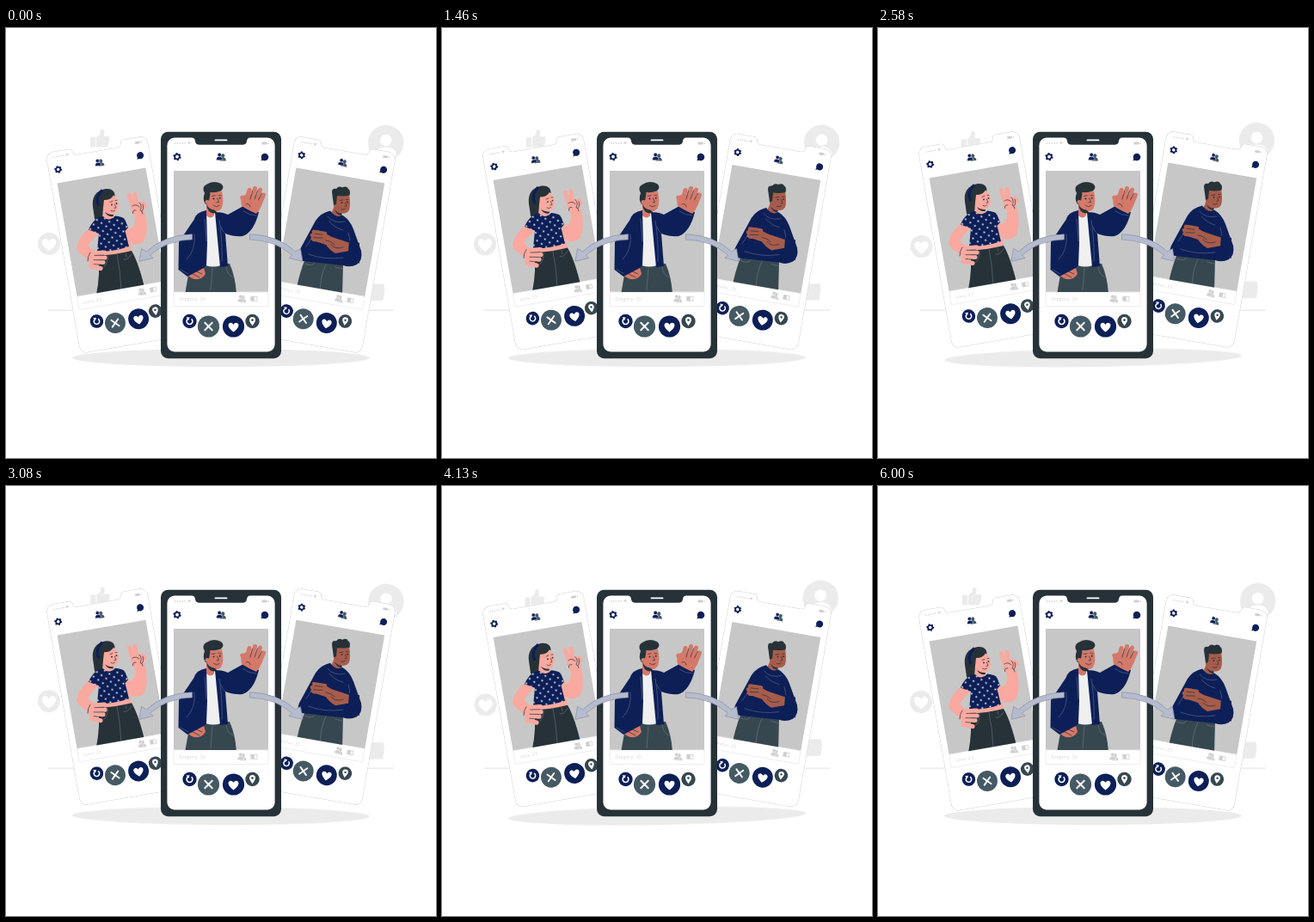
These frames come from a looping animation (500 px wide and 500 px high, 6040 ms). An HTML page without scripts:

```html
<!DOCTYPE html>
<html lang="en">
<head>
<meta charset="utf-8">
<title>Dating cards</title>
<style>
html, body { margin: 0; width: 100%; height: 100%; overflow: hidden; background: #fff; }
svg { display: block; width: 100vw; height: 100vh; }
.navy { fill: #0d1f57; }
.slate { fill: #455a64; }
.dark { fill: #263238; }
.pale { fill: #ebebeb; }
.white { fill: #fff; }
.pink { fill: #f9a99f; }
.tan { fill: #d4796a; }
.brown { fill: #a75c4b; }
.line { fill: none; stroke: #263238; stroke-width: .7; stroke-linecap: round; stroke-linejoin: round; }
.thin { fill: none; stroke: #8b93a6; stroke-width: .4; stroke-linecap: round; }
.limb { fill: none; stroke-linecap: round; stroke-linejoin: round; }
.pinkl { stroke: #f9a99f; }
.tanl { stroke: #d4796a; }
.brownl { stroke: #a75c4b; }
.edge { stroke: #e9e9e9; stroke-width: .8; }
text { font: 5.3px Lato, "Open Sans", sans-serif; letter-spacing: .3px; fill: #d6d6d6; }
.float { animation: float 6.04s linear infinite; }
.wind { transform-box: fill-box; transform-origin: center; animation: wind 6.04s linear infinite; }
@keyframes float {
  0%, 99.34%, 100% { transform: translateY(0); }
  49.67% { transform: translateY(-7px); }
}
@keyframes wind {
  0%, 99.34%, 100% { transform: rotate(0deg); }
  6.21%, 31.04%, 55.88%, 80.71% { transform: rotate(1deg); }
  18.63%, 43.46%, 68.29%, 93.13% { transform: rotate(-1deg); }
}
</style>
</head>
<body>
<svg viewBox="0 0 500 500">
<defs>
  <path id="heart" d="M0 5.6C-3 3.2-6 .6-6-2.2C-6-5.8-1.6-6.4 0-3C1.6-6.4 6-5.8 6-2.2C6 .6 3 3.2 0 5.6Z"/>
  <path id="bust" d="M-3.6 4Q-3.8-.2 0-.2Q3.8-.2 3.6 4ZM0-4.4a2.2 2.2 0 1 1 0 4.4a2.2 2.2 0 1 1 0-4.4Z"/>
  <path id="screen" d="M-54-22.500H-34Q-30.500-22.500-30-18.500Q-29.500-14.200-25-14.200H25Q29.500-14.200 30-18.500Q30.500-22.500 34-22.500H54A8.600 8.600 0 0 1 62.600-13.500V218A8.600 8.600 0 0 1 54 226.500H-54A8.600 8.600 0 0 1-62.600 218V-13.500A8.600 8.600 0 0 1-54-22.500Z"/>
  <rect id="photo" x="-55" y="16" width="110" height="141"/>
  <clipPath id="clipL"><use href="#photo" transform="translate(108.4 156.5) rotate(-9.9) scale(.949)"/></clipPath>
  <clipPath id="clipC"><use href="#photo" transform="translate(250 150)"/></clipPath>
  <clipPath id="clipR"><use href="#photo" transform="translate(391.4 156.5) rotate(9.9) scale(.949)"/></clipPath>
  <pattern id="dots" width="6.600" height="6.600" patternUnits="userSpaceOnUse" patternTransform="rotate(35)">
    <rect width="7" height="7" class="navy"/>
    <circle cx="3.300" cy="3.300" r="1.050" class="white"/>
  </pattern>

  <g id="card">
    <use href="#screen" class="white"/>
    <!-- status bar -->
    <path d="M-54-16H-41" stroke="#d4d4d4" stroke-width="1.400" stroke-dasharray="1.500 1.400"/>
    <path d="M-39-17Q-37-18.500-35-17L-37-14.500Z" fill="#d4d4d4"/>
    <rect x="47.500" y="-17.500" width="6" height="3" rx=".6" fill="#cfcfcf"/>
    <path d="M55.200-17V-15" stroke="#cfcfcf"/>
    <!-- header -->
    <g fill="none" stroke="#0d1f57" transform="translate(-51 -.3)">
      <circle r="2.800" stroke-width="1.900"/>
      <circle r="3.900" stroke-width="1.500" stroke-dasharray="2.040"/>
    </g>
    <use href="#bust" x="2.200" y=".6" class="slate"/>
    <use href="#bust" x="-1.800" y="-.3" class="navy" stroke="#fff" stroke-width=".4"/>
    <path class="navy" d="M51-4.300a4.300 4.300 0 1 1-2.200 8L46.400 4.400L47.300 2.100A4.300 4.300 0 0 1 51-4.300Z"/>
    <!-- photo and caption -->
    <use href="#photo" fill="#c7c7c7"/>
    <rect x="-55" y="157" width="110" height="16.500" class="white edge"/>
    <g fill="#cfcfcf">
      <use href="#bust" x="25.500" y="165.300"/>
      <use href="#bust" x="22.800" y="164.600" stroke="#fff" stroke-width=".4"/>
      <rect x="34.800" y="162.200" width="4" height="5"/>
    </g>
    <rect x="34.800" y="162.200" width="7.200" height="5" fill="none" stroke="#cfcfcf" stroke-width=".8"/>
    <!-- buttons -->
    <circle cx="-36.500" cy="191" r="8.200" class="navy"/>
    <path d="M-38.600 188.400A3.400 3.400 0 1 0-34.400 188.400" fill="none" stroke="#fff" stroke-width="1.600"/>
    <path class="white" d="M-40.300 186.200L-36.200 186.500L-38 190.200Z"/>
    <circle cx="-14.500" cy="197" r="12.600" class="slate"/>
    <path d="M-18.700 192.800l8.400 8.400m0-8.400l-8.400 8.400" stroke="#fff" stroke-width="2" stroke-linecap="round"/>
    <circle cx="14.500" cy="197" r="12.600" class="navy"/>
    <use href="#heart" x="14.500" y="198" class="white"/>
    <circle cx="36.500" cy="191" r="8.200" fill="#37474f"/>
    <path class="white" d="M36.500 196.200Q33 191.500 33 189.500A3.500 3.500 0 0 1 40 189.500Q40 191.500 36.500 196.200Z"/>
    <circle cx="36.500" cy="189.600" r="1.300" fill="#37474f"/>
  </g>

  <path id="arrow" d="M216.500 239.800Q183 241 163.500 260L157.500 256.500L155 271.300L171 267.500L167.500 264Q188 246.500 216.500 246Z" fill="#b6bccd" stroke="#7f88a5" stroke-width=".6" stroke-linejoin="round"/>
</defs>

<path d="M49 328.100H451" stroke="#e0e0e0"/>
<ellipse cx="250" cy="383.500" rx="173" ry="10.500" class="wind pale"/>

<g class="wind pale">
  <path d="M98 127h6v11.500h-6ZM105 127Q110 124.500 110 119Q113.500 116 114.500 120.500Q114.500 123.500 113.500 126H119Q121.500 127 120 129.500Q121 131.500 119.500 133Q120 135 118.500 136Q118.500 138.500 116 138.500H105Z"/>
  <path d="M418 297.500H438Q441 298.500 439.500 301.500Q441.500 304 439.500 306.500Q441 309.500 439 312Q440 317 436 317H418Z"/>
  <circle cx="50" cy="251" r="13"/>
  <use href="#heart" transform="translate(50 252) scale(1.350)" class="white"/>
  <circle cx="441.700" cy="133.500" r="20.700"/>
  <g class="white">
    <circle cx="441.700" cy="130.500" r="6.800"/>
    <path d="M429.700 149Q429.700 138.500 441.700 138.500Q453.700 138.500 453.700 149Z"/>
  </g>
</g>

<g class="float">
  <g transform="translate(108.4 156.5) rotate(-9.9) scale(.949)">
    <use href="#screen" class="edge"/>
    <use href="#card"/>
    <text x="-48" y="167.300">Lena, 23</text>
  </g>
  <!-- woman with raised hand -->
  <g clip-path="url(#clipL)">
    <path class="dark" d="M110 189C119 184.500 127 188 126.500 195L119 212L114 224Q107 227 103 222Q102 214 101 208Q100 200 103 195Q105 191 110 189Z"/>
    <path class="pink" d="M114 200Q122 200 125 194.500Q130 198 131 206Q130.500 215.500 124 217L126 221Q120 227 112 222L113 209Z"/>
    <path class="dark" d="M115 214Q119 217.500 125 217L124.500 219Q118 220 115 214Z"/>
    <path d="M108 207Q103 197 112 188.500" fill="none" stroke="#0d1f57" stroke-width="3.200"/>
    <path class="line" d="M121 202.500l3-1.200M127 200.500l2-.2M126.500 205l1.500 4l-2 .4M122 212.500q2.500 1.500 4.500-.5"/>
    <circle cx="123" cy="205.500" r=".9" class="dark"/>
    <circle cx="128.500" cy="204" r=".9" class="dark"/>
    <path class="limb pinkl" stroke-width="12.500" d="M101 237Q89 248 88.500 256Q94 261 103 268"/>
    <path class="pink" d="M106 258L145 251L146 261L107 267Z"/>
    <path class="pink" d="M138 228L139 247Q151 256 160 248Q167 236 161 213L149 213Q152 224 148 231L144 234Z"/>
    <path class="dark" d="M107 264.500Q126 264 146 259Q155 274 163 310H105Q110 285 107 264.500Z"/>
    <path class="thin" d="M129 263Q133 282 134 304M118 265q1 8-4 13M146 263q-5 8-9 6M139 262l1 4"/>
    <path fill="url(#dots)" d="M105 222Q110 219 113 219Q119 226 127 218.500Q135 219 138 222L142 232L138.500 236L143 254Q126 260 106 260L108 239L96 234.500Q99 227 105 222Z"/>
    <path class="limb pinkl" stroke-width="5.200" d="M101 262L114.500 261M100 267L115 267M99 272L113 272.500M99 277L110 279.500"/>
    <path class="line" d="M103 264.500l11-.4M102 269.700l11 .1M102 274.500l9 1M98 261q-3 4-3 10"/>
    <path class="pink" d="M146 205Q154 199 160 205Q162 214 158 218H149Q143 210 146 205Z"/>
    <path class="limb pinkl" stroke-width="5.200" d="M147.500 207L143.500 195M151.500 206L150 193.500M159 204L161 207"/>
    <path class="line" d="M147 207q4-3 8 1M151 212q-4-1-3.500 3.500M155 203q4 4 1 9q3 1 3 4M159 205q2 5-1 8"/>
  </g>

  <g transform="translate(391.4 156.5) rotate(9.9) scale(.949)">
    <use href="#screen" class="edge"/>
    <use href="#card"/>
    <text x="-48" y="167.300">Rufus, 25</text>
  </g>
  <!-- man with folded arms -->
  <g clip-path="url(#clipR)">
    <path fill="#37474f" d="M348 268L392 274L391 312H336Q340 288 348 268Z"/>
    <path class="thin" d="M372 275Q366 286 365 306M347 274q9 4 12-1M391 280l-8-2"/>
    <path class="brown" d="M382 195L399 193Q401 205 399 212Q395 217 390 215L390 221Q384 226 377 218L381 209Z"/>
    <path class="dark" d="M381 206L379 191Q379 186 384 187Q387 183 391 185.500Q396 183 398 187Q401 189 399.500 194.500Q392 196 385 195L384 205Z"/>
    <path class="dark" d="M382 211Q386 216 391 215.500L390 218Q384 217 382 211Z"/>
    <path class="line" d="M388 200.500l4-.6M395.500 199.500l2.500.2M394.500 203l1.500 4l-2 .5M389.500 211q3 1 5-1"/>
    <circle cx="390.500" cy="203" r=".9" class="dark"/>
    <circle cx="397" cy="202.500" r=".9" class="dark"/>
    <path class="navy" d="M377 212.500Q384 222 391 217.500Q400 223 404 234L413 259Q415 270 408 275Q400 279 392 276L345 271Q337 267 341 259L360 224Q366 215 377 212.500Z"/>
    <path class="thin" d="M374 219q7 9 20 6M376 225q7 8 16 10M352 263q18 7 40 4M398 238q3 7 1 14M349 254l7-10"/>
    <path class="brown" d="M356 240Q359 234 366 236L379 243L400 250L400 259L383 262Q376 258 372 252L354 246Z"/>
    <path class="limb brownl" stroke-width="4.600" d="M371 239L358 237M372 242L356 241M374 246L358 246"/>
    <path class="line" d="M359 239.200l9 1M358 243.800l10 .3M372 247q7 1 10 5M378 252q5 6 14 3" stroke="#5b2c26"/>
    <path class="navy" d="M399 247L411 250L411 274L398 261Z"/>
  </g>
</g>

<!-- phone -->
<rect x="180" y="120.800" width="140" height="263.400" rx="8.500" class="dark"/>
<path d="M243.500 130.400H256.500" stroke="#fff" stroke-width="1.900" stroke-linecap="round"/>
<g transform="translate(250 150)">
  <use href="#card"/>
  <text x="-48.500" y="167.300">Gregory, 30</text>
</g>
<!-- waving man -->
<g clip-path="url(#clipC)">
  <path fill="#37474f" d="M214 276L260 274Q267 290 268 310H208Z"/>
  <path class="thin" d="M240 279Q239 291 238 305M256 278q1 9 8 12"/>
  <path fill="#f0f0f0" d="M232 215L247 213L250 276Q241 279 232 276Z"/>
  <path class="tan" d="M233 192L251 190Q254 202 250.500 210Q246 215 242 213L242 218Q238 223 233 218Z"/>
  <path class="dark" d="M232 205Q228 199 231 192Q227 185 233 182Q241 176.500 250 181Q255 185 250 189.500Q243 192 237.500 191Q237 200 234 205Z"/>
  <path class="dark" d="M233 204Q235 211 242 211.500Q247 214 243 215.500Q234 216 233 204Z"/>
  <circle cx="234" cy="202.500" r="2.400" class="tan"/>
  <path class="line" d="M239.500 195.500l3.500-.8M247 194.500l3 .4M245.500 198l2 4.500l-2.400.4M241.500 206.500q3 2.500 6.500.2"/>
  <circle cx="241.500" cy="198.500" r=".95" class="dark"/>
  <circle cx="248.700" cy="197.800" r=".95" class="dark"/>
  <path class="tan" d="M213 279L229 275L232 286Q226 295 216 291L210 287Z"/>
  <path class="line" d="M217 286l8 4M219 282l9 4"/>
  <path class="navy" d="M233 212Q221 214 218.500 223L201 249L200.500 281L211 289L230 279L233 276L234 250Z"/>
  <path class="navy" d="M243 214Q252 214 258 217L276 207L294 214Q288 238 275 242Q266 243 255 239L258 277L249 278Z"/>
  <path class="thin" d="M219 240q2 18-9 29M203 281l9 5M231 222l2 26M248 224q4 25 3 47M255 239q-4-3-5-8M276 213q7 5 15 5"/>
  <path class="tan" d="M274 207Q272 201 276 195L280 193L299 197Q298 209 291 216Q282 212 274 207Z"/>
  <path class="limb tanl" stroke-width="5" d="M280 200L283 188.500M286 200L289.500 186.500M291 201L295.500 188M295 205L299.500 194M277 203L274.800 197"/>
  <path class="line" d="M284 199L286.500 189.500M289 199L292.500 189M293.500 200L297.500 192M279 205q4-2 5 3"/>
</g>

<use href="#arrow"/>
<use href="#arrow" transform="matrix(-1 0 0 1 500 0)"/>
</svg>
</body>
</html>
```
